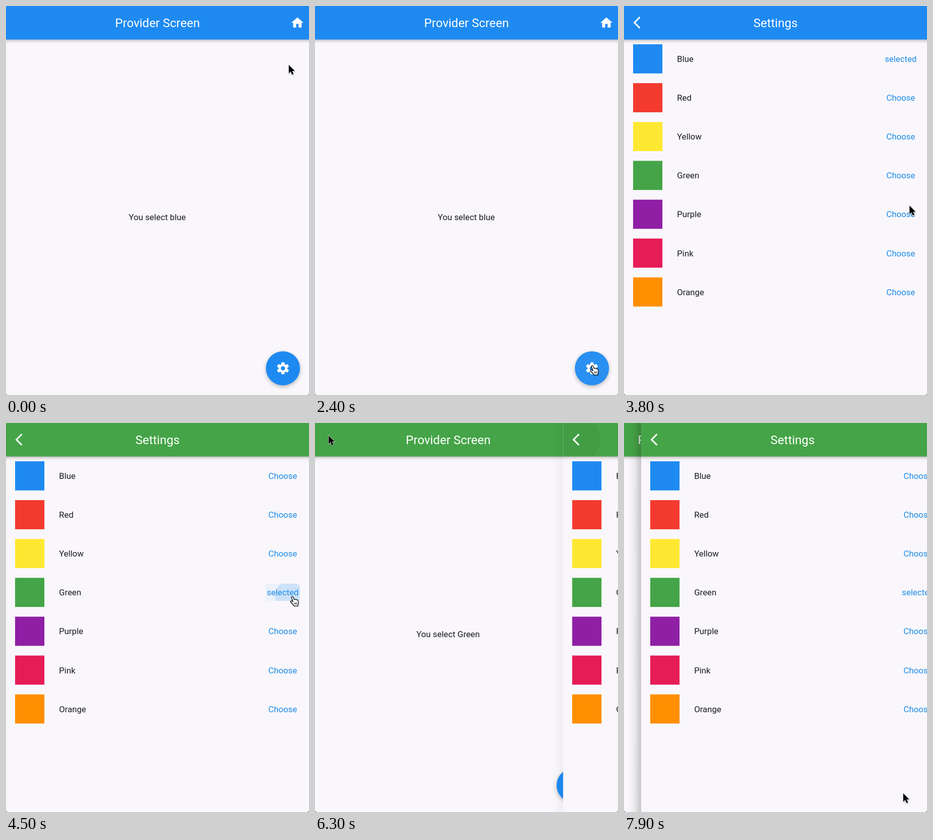
These frames come from a looping animation (600x772 px, 8 s). An HTML page:

```html
<!DOCTYPE html>
<html lang="en">
<head>
<meta charset="utf-8">
<title>Color settings</title>
<style>
html, body { margin: 0; width: 100%; height: 100%; overflow: hidden; background: #f9f7fb; }
svg { display: block; width: 600px; height: 772px; }
text { font: 16.8px Roboto, Arial, sans-serif; fill: #1d1c1f; }
.title { font-size: 24px; fill: #fff; }
.mid { text-anchor: middle; }
.action { fill: #1e8be8; }
#cursor { filter: drop-shadow(0 1px 1px rgba(0,0,0,.35)); }
</style>
</head>
<body>
<svg viewBox="0 0 600 772">
  <defs>
    <linearGradient id="barShade" x2="0" y2="1">
      <stop stop-opacity=".25"/><stop offset=".3" stop-opacity=".12"/>
      <stop offset=".65" stop-opacity=".03"/><stop offset="1" stop-opacity="0"/>
    </linearGradient>
    <linearGradient id="edgeShade">
      <stop stop-opacity="0"/><stop offset=".3" stop-opacity=".016"/>
      <stop offset=".6" stop-opacity=".07"/><stop offset="1" stop-opacity=".22"/>
    </linearGradient>
    <filter id="blur" x="-40%" y="-40%" width="180%" height="180%"><feGaussianBlur stdDeviation="5"/></filter>
    <clipPath id="buttonClip"><rect x="514" y="319" width="68" height="34" rx="5"/></clipPath>
    <clipPath id="barClip"><rect width="600" height="66.5"/></clipPath>
    <path id="tooth" d="M-2-9.6H2L2.6-5.5V5.5L2 9.6H-2L-2.6 5.5V-5.5z" stroke="#fff" stroke-width=".8" stroke-linejoin="round"/>
  </defs>

  <g id="home">
    <rect width="600" height="772" fill="#f9f7fb"/>
    <rect y="66" width="600" height="10" fill="url(#barShade)"/>
    <rect class="bar" width="600" height="66.5"/>
    <text class="title mid" x="300" y="41.5">Provider Screen</text>
    <path transform="translate(562.6 18.8) scale(1.2)" fill="#fff" d="M10 20v-6h4v6h5v-8h3L12 3 2 12h3v8z"/>
    <text id="message" class="mid" x="299.7" y="425"></text>
    <circle cx="548.4" cy="722" r="33" opacity=".3" filter="url(#blur)"/>
    <circle cx="548.4" cy="719" r="33.8" fill="#1e8af1"/>
    <circle id="fabGlow" cx="548.4" cy="719" r="33.8" fill="#fff"/>
    <g transform="translate(548.4 719) scale(1.2)" fill="#fff">
      <use href="#tooth"/><use href="#tooth" transform="rotate(60)"/><use href="#tooth" transform="rotate(120)"/>
      <circle r="7.3"/><circle r="3.5" fill="#1e8af1"/>
    </g>
  </g>

  <g id="settings">
    <rect id="edge" x="-30" width="30" height="772" fill="url(#edgeShade)"/>
    <rect width="600" height="772" fill="#f9f7fb"/>
    <rect y="66" width="600" height="10" fill="url(#barShade)"/>
    <rect class="bar" width="600" height="66.5"/>
    <circle id="backGlow" cx="26" cy="33" r="48" opacity=".045" clip-path="url(#barClip)"/>
    <path transform="translate(18.5 18.6) scale(1.2)" fill="#fff" d="M11.67 3.87 9.9 2.1 0 12l9.9 9.9 1.77-1.77L3.54 12z"/>
    <text class="title mid" x="300" y="41.5">Settings</text>
    <rect id="hover" x="514" width="68" height="34" rx="5" fill="#1e8be8" opacity=".06"/>
    <g clip-path="url(#buttonClip)"><circle id="ripple" fill="#1e8be8"/></g>
    <g id="rows"></g>
  </g>

  <path d="M0 768.5Q0 772 3.5 772H0zM600 768.5Q600 772 596.5 772H600z" fill="#222"/>

  <g id="cursor">
    <path id="arrow" d="M0 0V16.6l3.8-3.5 2.7 6.2 2.9-1.2-2.6-6H12z" stroke="#fff" stroke-width="1.2" paint-order="stroke"/>
    <g id="hand" transform="translate(-4 -1)" fill="#fff" stroke="#000" stroke-width="1.2" stroke-linejoin="round">
      <path d="M5 9 2.6 3Q2 1 3.7.6T6 2L7.6 6.3Q8.6 5.2 10 6.6 11.6 5.4 12.8 7.2 15 6.6 15.4 8.6L16.2 12Q16.5 14.5 15 16.5V19H7.5Q6.5 16.5 4 14.5L.6 11.2Q0 9.2 2 9 3.4 9 5.2 11z"/>
      <path d="M8.4 12.5v3.5M10.6 12.3v3.7M12.8 12.2v3.6" stroke-width="1"/>
    </g>
  </g>
</svg>

<script>
const LOOP = 8000, SLIDE = 300, BLUE = '#1e8af1', GREEN = '#45a447';
const PUSH = [2752, 7734], POP = 6190, PICK = 4470;
const COLORS = [['Blue', BLUE], ['Red', '#f33a2f'], ['Yellow', '#ffe832'], ['Green', GREEN],
  ['Purple', '#8f1fa5'], ['Pink', '#e61c57'], ['Orange', '#ff8f00']];
const PITCH = 77.1;

// time, x, y of the pointer tip
const TRACK = [[0, 560, 117], [950, 560, 117], [1500, 519, 458], [1820, 540, 690], [2000, 549, 714],
  [3050, 549, 714], [3500, 560, 545], [4000, 567, 345], [4800, 567, 345], [5300, 130, 80],
  [5600, 27, 25], [6350, 27, 25], [7100, 494, 480], [7500, 553, 735], [8000, 553, 735]];

const $ = id => document.getElementById(id);
const clamp = v => Math.max(0, Math.min(1, v));
const show = (el, on) => el.setAttribute('visibility', on ? 'inherit' : 'hidden');
const set = (el, attrs) => { for (const k in attrs) el.setAttribute(k, attrs[k]); };

$('rows').innerHTML = COLORS.map(([name, color], i) => {
  const y = 76 + i * PITCH;
  return `<rect x="18" y="${y}" width="58" height="57.8" fill="${color}"/>
    <text x="105" y="${y + 35}">${name}</text>
    <text class="action mid" x="548" y="${y + 35}"></text>`;
}).join('');
const bars = document.querySelectorAll('.bar');
const actions = document.querySelectorAll('.action');

function slope(k, axis) {
  const a = TRACK[k - 1], b = TRACK[k], c = TRACK[k + 1];
  if (!a || !c || a[2] === b[2] || b[2] === c[2]) return 0;
  return (c[axis] - a[axis]) / (c[0] - a[0]);
}

function pointer(t) {
  const k = TRACK.findIndex((p, i) => i + 1 < TRACK.length && t < TRACK[i + 1][0]);
  const a = TRACK[k], b = TRACK[k + 1], span = b[0] - a[0], u = (t - a[0]) / span, v = 1 - u;
  return [1, 2].map(axis => v * v * (1 + 2 * u) * a[axis] + u * u * (3 - 2 * u) * b[axis]
    + span * u * v * (v * slope(k, axis) - u * slope(k + 1, axis)));
}

const bezier = (s, p, q) => 3 * s * (1 - s) ** 2 * p + 3 * s * s * (1 - s) * q + s ** 3;

function ease(x) {
  if (x <= 0 || x >= 1) return clamp(x);
  let lo = 0, hi = 1;
  for (let i = 0; i < 24; i++) {
    const mid = (lo + hi) / 2;
    if (bezier(mid, .35, .33) < x) lo = mid; else hi = mid;
  }
  return bezier(lo, .91, .97);
}

function progress(t) {
  if (t < POP) return ease((t - PUSH[0]) / SLIDE);
  if (t < PUSH[1]) return 1 - ease((t - POP) / SLIDE);
  return ease((t - PUSH[1]) / SLIDE);
}

function render(t) {
  const [x, y] = pointer(t), p = progress(t), picked = t >= PICK;
  const chosen = picked ? 3 : 0;

  bars.forEach(bar => set(bar, { fill: picked ? GREEN : BLUE }));
  $('message').textContent = 'You select ' + (picked ? 'Green' : 'blue');
  actions.forEach((el, i) => { el.textContent = i === chosen ? 'selected' : 'Choose'; });

  set($('home'), { transform: `translate(${-200 * p} 0)` });
  set($('settings'), { transform: `translate(${600 * (1 - p)} 0)` });
  show($('settings'), p > 0);
  set($('edge'), { opacity: p });

  const onFab = p === 0 && Math.hypot(x - 548.4, y - 719) < 33.8;
  const pressed = PUSH.some(s => t > s - 90 && t < s + SLIDE);
  set($('fabGlow'), { opacity: pressed ? .14 : onFab ? .05 : 0 });

  const row = Math.round((y - 105) / PITCH);
  const onButton = p === 1 && row >= 0 && row < 7
    && Math.abs(x - 548) < 34 && Math.abs(y - 105 - row * PITCH) < 17;
  show($('hover'), onButton);
  set($('hover'), { y: 88 + row * PITCH - .3 });

  const k = clamp((t - 4430) / 200);
  set($('ripple'), { cx: 567 - 19 * k, cy: 345 - 9 * k, r: 10 + 50 * k,
    opacity: t < 4430 ? 0 : .15 * clamp((4875 - t) / 375) });

  show($('backGlow'), t > 5000 && t < POP + SLIDE && Math.hypot(x - 26, y - 33) < 34);

  const hand = onFab || onButton;
  show($('arrow'), !hand);
  show($('hand'), hand);
  set($('cursor'), { transform: `translate(${x} ${y})` });
}

const start = performance.now();
function tick() {
  render((performance.now() - start) % LOOP);
  requestAnimationFrame(tick);
}
tick();
</script>
</body>
</html>
```
